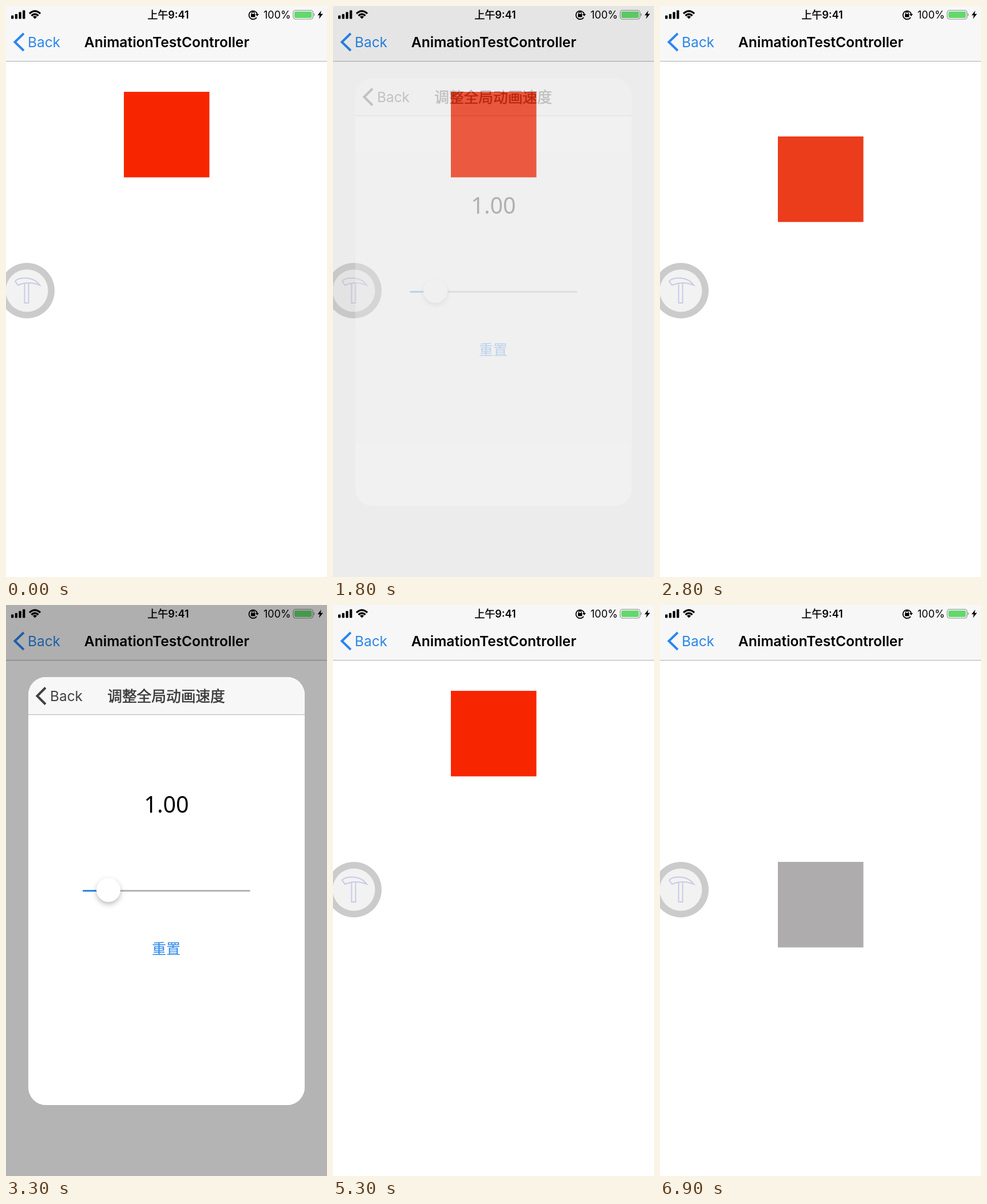
These frames come from a looping animation (561x998 px, 7 s). An HTML page:

```html
<!DOCTYPE html>
<html lang="zh">
<meta charset="utf-8">
<style>
  html, body { margin: 0; width: 100%; height: 100%; overflow: hidden; background: #fff; }
  svg { display: block; width: 100vw; height: 100vh; }
  text { font-family: Inter, "Noto Sans CJK SC", "Noto Sans CJK", sans-serif; }
  .mid { text-anchor: middle; }
  .nav { font-size: 24.4px; }
  .heading { font-size: 24.6px; font-weight: 600; }
  .cjk { font-size: 25.7px; fill: #3a3a3a; stroke: #3a3a3a; stroke-width: 0.6; }
  .status { font-size: 18px; }
  .value { font: 39.5px "Noto Sans", sans-serif; }
  .blue { fill: #2a86ea; }
  .line { fill: none; stroke-width: 4; }
  .card { fill: #fff; filter: drop-shadow(0 2px 5px #0001); }
  .card-title { font-size: 19.5px; font-weight: 600; fill: #444; }
  .card-text { font-size: 14.5px; fill: #999; }
  #thumb { filter: drop-shadow(0 4px 5px #0004); }
  #speedPage > rect:first-child { filter: drop-shadow(-3px 0 5px #0001); }
</style>
<svg viewBox="0 0 561 998" preserveAspectRatio="none">
  <defs>
    <clipPath id="panelShape"><rect x="39" y="126" width="483" height="748" rx="31"/></clipPath>
    <g id="hammer" fill="none" stroke-width="2">
      <path d="M32.5 485V519H39.5V484"/>
      <path d="M16 481Q20 476 31 475.500Q50 475 59 488Q40 480 21 488Z"/>
    </g>
  </defs>

  <rect width="561" height="998" fill="#fff"/>
  <rect width="561" height="96" fill="#f7f7f7"/>
  <rect y="96" width="561" height="1.2" fill="#b8b8b8"/>

  <g id="signal"></g>
  <g fill="none" stroke="#000" stroke-width="3.2">
    <path d="M41 13.2Q50.5 4.5 60 13.2"/>
    <path d="M44.5 17Q50.5 11.5 56.5 17"/>
  </g>
  <path d="M50.5 22.5L46.8 18.8Q50.5 15.8 54.2 18.8Z"/>
  <text class="status mid" x="283.5" y="21.8" font-weight="600"><tspan font-weight="400" stroke="#000" stroke-width=".4">上午</tspan>9:41</text>
  <path d="M438 20A7.3 7.3 0 1 1 439 14" fill="none" stroke="#000" stroke-width="1.7"/>
  <path d="M436 14H442L439 18Z"/>
  <rect x="428" y="14" width="7.5" height="5.5" rx="1"/>
  <path d="M429.5 14V12.5A2.2 2.2 0 0 1 434 12.5V14" fill="none" stroke="#000" stroke-width="1.3"/>
  <text class="status" x="450" y="21.8">100%</text>
  <rect x="502" y="7.5" width="34.5" height="15.5" rx="4" fill="#fff" stroke="#888" stroke-width="1.2"/>
  <rect x="504" y="9.5" width="30.5" height="11.5" rx="2" fill="#63d86c"/>
  <path d="M538 12.5Q541 15 538 18Z" fill="#888"/>
  <path d="M551 8L544.5 16.2H548.3L547 22.5L554 13.8H549.8Z"/>

  <path class="line" d="M31 48L15.5 63L31 78" stroke="#2a86f0"/>
  <text class="nav blue" x="38" y="72">Back</text>
  <text class="heading mid" x="281" y="72">AnimationTestController</text>

  <rect id="square" x="206" width="149.5" height="149.5"/>
  <g id="button">
    <circle cx="36.5" cy="497.5" r="48.5" fill="#cbcbcb"/>
    <circle cx="36.5" cy="497.5" r="37" fill="#f2f2f2"/>
    <use href="#hammer" stroke="#cacae6"/>
  </g>
  <rect id="dim" width="561" height="998"/>

  <g id="panel" clip-path="url(#panelShape)">
    <rect x="39" y="126" width="483" height="748" fill="#f1f1f1"/>
    <g id="listPage">
      <rect x="39" y="210" width="483" height="40" fill="#fff"/>
      <text class="blue" x="161" y="235.5" font-size="18">通用</text>
      <g id="cards"></g>
    </g>
    <rect id="shade" x="39" y="126" width="483" height="748"/>
    <g id="speedPage">
      <rect x="39" y="126" width="483" height="748" fill="#fff"/>
      <text id="value" class="value mid" x="280.5" y="362.5"></text>
      <rect x="134" y="498" width="293" height="3" rx="1.5" fill="#b4b4b4"/>
      <rect id="fill" class="blue" x="134" y="498" height="3" rx="1.5"/>
      <circle id="thumb" cy="498" r="21" fill="#fff"/>
      <text class="blue mid" x="280" y="610" font-size="25">重置</text>
    </g>
    <rect x="39" y="126" width="483" height="65" fill="#f7f7f7"/>
    <rect x="39" y="191" width="483" height="1.2" fill="#bdbdbd"/>
    <g id="listIcon" transform="translate(243 -337)"><use href="#hammer" stroke="#666"/></g>
    <g id="speedNav">
      <path class="line" d="M69 144.5L54.5 159L69 173.5" stroke="#404040"/>
      <text id="back" class="nav" y="167.5" fill="#404040">Back</text>
      <text id="speedTitle" class="cjk mid" y="168.5">调整全局动画速度</text>
    </g>
  </g>
</svg>
<script>
const LOOP = 7000, STEP = 100;
const el = id => document.getElementById(id);
const set = (id, attrs) => {
  for (const name in attrs) el(id).setAttribute(name, attrs[name]);
};
const mix = (a, b, p) => a + (b - a) * p;
const ramp = (t, start, end) => Math.min(1, Math.max(0, (t - start) / (end - start)));
const easeInOut = u => (1 - Math.cos(Math.PI * u)) / 2;
const easeOut = u => 1 - (1 - u) ** 3;

el('signal').innerHTML = [6, 8.5, 12, 15].map((h, i) =>
  `<rect x="${9 + i * 6.7}" y="${22.5 - h}" width="4.3" height="${h}" rx="1"/>`).join('');

const cards = [
  ['调整全局动画速度', '可以方便地调试动画效果'],
  ['缓存', '管理沙盒路径Cache', '可清除的缓存文件'],
  ['调试常用工具列表', '支持读取的plist，', '包含字典方法数组']
];
el('cards').innerHTML = cards.map(([title, ...lines], i) => {
  const y = 289 + i * 127;
  return `<rect class="card" x="39" y="${y}" width="483" height="103"/>
    <text class="card-title" x="90" y="${y + 34}">${title}</text>` +
    lines.map((line, k) =>
      `<text class="card-text" x="90" y="${y + 65 + k * 21}">${line}</text>`).join('');
}).join('');

// Each visit to the panel: fade in, push the speed page, drag the slider, fade out.
const visits = [
  { open: [420, 750], push: [906, 1406], drag: [1500, 1600], close: [1600, 1900], from: 1, to: 1 },
  { open: [2840, 3000], push: [2960, 3260], drag: [3520, 4000], close: [4000, 4300], from: 1, to: 2 },
  { open: [5330, 5550], push: [5480, 5740], drag: [5700, 5900], close: [5900, 6100], from: 2, to: 1 }
];
// Square trips: start, duration of one leg, whether it returns to the top.
const trips = [[2104, 420, true], [4560, 370, true], [6092, 450, false]];

function drop(t) {
  const trip = trips.findLast(([start]) => t >= start);
  if (!trip) return 0;
  const [start, leg, returns] = trip;
  const down = easeInOut(ramp(t, start, start + leg));
  return returns ? down - easeInOut(ramp(t, start + leg, start + 2 * leg)) : down;
}

function drawSquare(t) {
  const p = drop(t);
  const tint = easeInOut(p);
  const rgb = [[247, 174], [38, 172], [0, 172]].map(([a, b]) => Math.round(mix(a, b, tint)));
  set('square', { y: Math.round(mix(149.6, 449, p)), fill: `rgb(${rgb})` });
}

function drawPanel(t) {
  const visit = visits.findLast(v => t >= v.open[0]) || visits[0];
  const shown = easeInOut(ramp(t, ...visit.open)) - easeInOut(ramp(t, ...visit.close));
  const pushed = easeOut(ramp(t, ...visit.push));
  const speed = mix(visit.from, visit.to, easeInOut(ramp(t, ...visit.drag)));
  const away = 1 - pushed;
  const thumbX = 155 + 24 * speed;

  set('dim', { opacity: 0.293 * shown });
  set('button', { opacity: 1 - shown });
  set('panel', { opacity: shown });
  set('listPage', { transform: `translate(${-145 * pushed} 0)` });
  set('shade', { opacity: 0.06 * pushed });
  set('speedPage', { transform: `translate(${483 * away} 0)`, opacity: pushed > 0 ? 1 : 0 });
  set('listIcon', { opacity: away });
  set('speedNav', { opacity: pushed });
  set('back', { x: 77 + 43 * away });
  set('speedTitle', { x: 280 + 329 * away });
  set('thumb', { cx: thumbX });
  set('fill', { width: thumbX - 134 });
  el('value').textContent = speed.toFixed(2);
}

function frame() {
  const t = Math.floor(performance.now() % LOOP / STEP) * STEP;
  drawSquare(t);
  drawPanel(t);
  requestAnimationFrame(frame);
}
frame();
</script>
</html>
```
